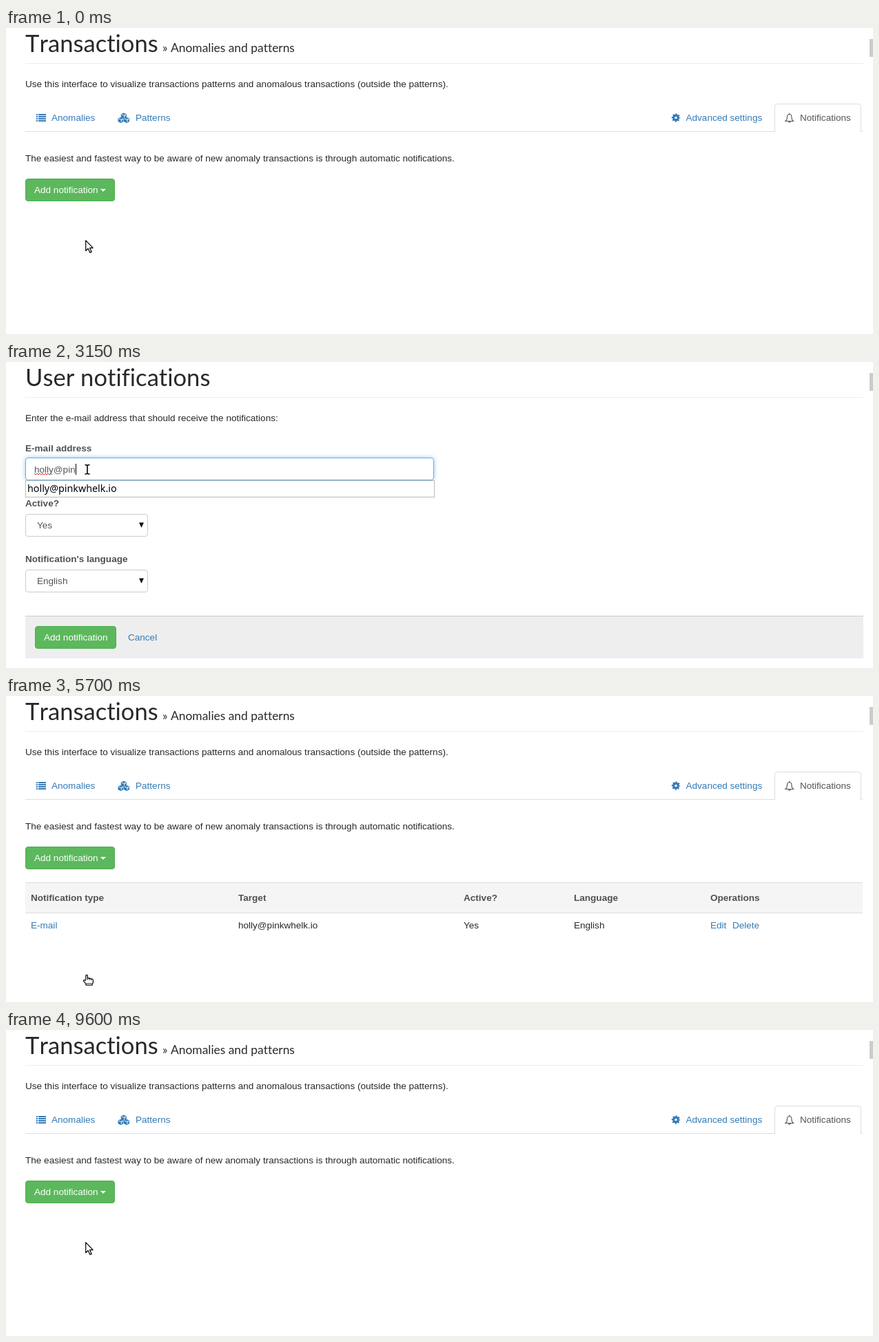
An HTML page for the animation above (9.75 s loop, 1258 by 445 pixels).

```html
<!DOCTYPE html>
<html lang="en">
<head>
<meta charset="utf-8">
<title>Transaction notifications</title>
<style>
  html, body { margin: 0; width: 100%; height: 100%; overflow: hidden; background: #fff; }
  svg { display: block; font: 13.55px "Liberation Sans", Arial, sans-serif; fill: #292929; }
  .title, .sub { font: 34.6px Lato, sans-serif; font-variant-ligatures: none; font-kerning: none; }
  .sub { font-size: 17.4px; }
  .link { fill: #337ab7; }
  .grey { fill: #555; }
  .bold { fill: #505050; font-weight: bold; }
  .white { fill: #fff; }
  .native { font: 500 14.3px "Noto Sans", sans-serif; fill: #000; }
  .button { fill: #5cb85c; stroke: #4cae4c; }
  .button.hover { fill: #449d44; stroke: #398439; }
  .button.active { fill: #398439; stroke: #255625; }
  .box { fill: #fff; stroke: #ccc; }
  .focus { stroke: #66afe9; filter: drop-shadow(0 0 3px rgba(102, 175, 233, .7)); }
  .shadow { filter: drop-shadow(0 2px 3px rgba(0, 0, 0, .3)); }
  .hovered { fill: #23527c; text-decoration: underline; }
  .cursor { fill: #fff; stroke: #000; stroke-linejoin: round; }
</style>
</head>
<body>
<svg id="stage" width="1258" height="445" viewBox="0 0 1258 445"></svg>
<script>
const STEP = 150, STEPS = 65, EMAIL = 'holly@pinkwhelk.io';

const text = (x, y, s, cls = '', id = '') => `<text x="${x}" y="${y}" class="${cls}" id="${id}">${s}</text>`;
const rect = (x, y, w, h, cls, id = '', r = 3.5) =>
  `<rect x="${x}" y="${y}" width="${w}" height="${h}" rx="${r}" class="${cls}" id="${id}"/>`;
const fill = (x, y, w, h, color, id = '') =>
  `<rect x="${x}" y="${y}" width="${w}" height="${h}" fill="${color}" id="${id}"/>`;
const path = (d, attrs) => `<path d="${d}" ${attrs}/>`;
const group = (id, ...parts) => `<g id="${id}">${parts.join('')}</g>`;

const select = (y, label, value) =>
  text(28, y - 11, label, 'bold') + rect(28.5, y + .5, 177, 32, 'box') + text(45, y + 21, value, 'grey') +
  path(`M193 ${y + 12.5}h7l-3.5 7.5z`, 'fill="#111"');

const cube = (x, y) =>
  path(`M${x} ${y - 4.3}l4 1.7v4.6l-4 2.2l-4-2.2v-4.6z`, 'fill="#337ab7"') +
  path(`M${x - 3.3} ${y - 2.1}l3.3 1.4l3.3-1.4M${x + .8} ${y + 2.9}v-2.8l2.2-1`, 'fill="none" stroke="#fff" stroke-width=".9"');

const listIcon = [0, 3, 6, 9].map(dy =>
  fill(44, 125 + dy, 2, 2, '#337ab7') + fill(47, 125 + dy, 11, 2, '#337ab7')).join('');
const cubesIcon = cube(170.8, 127.8) + cube(166.5, 134) + cube(175, 134);
const cogIcon = `<g fill="none" stroke="#337ab7"><circle cx="972" cy="130.5" r="3.3" stroke-width="3"/>
  <circle cx="972" cy="130.5" r="5" stroke-width="2.4" stroke-dasharray="2.2 1.727" stroke-dashoffset="1.1"/></g>`;
const bellIcon = path('M1131 135.5q2.5-2 2.5-6q0-3.8 3.2-4.2q3.2 .4 3.2 4.2q0 4 2.5 6zM1136.8 125v-1.3M1135.2 136.2q1.6 2 3.2 0',
  'fill="none" stroke="#555" stroke-width="1.1"');

const columns = [36, 337, 664, 824, 1022];
const cells = (labels, y, classes) => labels.map((s, i) => text(columns[i], y, s, classes[i])).join('');

const table = group('table',
  fill(28, 271, 1215, 44, '#f5f5f5'), fill(28, 271, 1215, 1, '#ddd'), fill(28, 315, 1215, 1, '#ddd'),
  cells(['Notification type', 'Target', 'Active?', 'Language', 'Operations'], 298, Array(5).fill('bold')),
  fill(28, 316, 1215, 34, '#f2f9fe', 'rowHover'),
  cells(['E-mail', EMAIL, 'Yes', 'English', 'Edit'], 338, ['link', '', '', '', 'link']),
  text(1054, 338, 'Delete', 'link', 'remove'));

const menu = group('menu', rect(27.5, 252.5, 156, 38, 'box shadow'),
  fill(28, 258, 155, 26, '#f5f5f5', 'menuHover'), text(48, 276, 'E-mail'));

const listPage = group('listPage',
  text(28, 35, 'Transactions', 'title'), text(227, 34.5, '»', 'sub'), text(239, 34.5, 'Anomalies and patterns', 'sub'),
  text(28, 86, 'Use this interface to visualize transactions patterns and anomalous transactions (outside the patterns).'),
  fill(28, 150, 1215, 1, '#ddd'),
  path('M1115.5 151v-36.5q0-4 4-4h117q4 0 4 4V151', 'fill="#fff" stroke="#ddd"'),
  listIcon, text(66, 135, 'Anomalies', 'link'), cubesIcon, text(188, 135, 'Patterns', 'link'),
  cogIcon, text(986.5, 135, 'Advanced settings', 'link'), bellIcon, text(1152, 135, 'Notifications', 'grey'),
  text(28, 194, 'The easiest and fastest way to be aware of new anomaly transactions is through automatic notifications.'),
  rect(28.5, 219.5, 129, 32, 'button', 'openMenu'), text(41, 240, 'Add notification', 'white'),
  path('M137 234h8l-4 4z', 'fill="#fff"'), table, menu);

const formPage = group('formPage',
  text(28, 35, 'User notifications', 'title'),
  text(28, 86, 'Enter the e-mail address that should receive the notifications:'),
  text(28, 130, 'E-mail address', 'bold'), rect(28.5, 139.5, 592, 32, 'box', 'field'),
  path('', 'id="squiggles" fill="none" stroke="#e22" stroke-width="1"'),
  text(41, 161, '', 'grey', 'typed'), fill(41, 148, 1, 16, '#000', 'caret'),
  select(221, 'Active?', 'Yes'), select(302, "Notification's language", 'English'),
  fill(28, 369, 1216, 62, '#eee'), fill(28, 369, 1216, 1, '#ccc'),
  rect(42.5, 384.5, 117, 32, 'button', 'submit'), text(55, 405, 'Add notification', 'white'), text(177, 405, 'Cancel', 'link'),
  group('popup', rect(28.5, 172.5, 593, 24, '', 'option', 0), text(31, 189, EMAIL, 'native')));

const dialog = group('dialog',
  `<linearGradient id="shine" x2="0" y2="1"><stop stop-color="#fff"/><stop offset="1" stop-color="#ececeb"/></linearGradient>`,
  `<rect x="308.5" y="-20" width="409" height="107.5" rx="2" fill="#f2f2f2" stroke="#a5a5a5" class="shadow"/>`,
  `<g fill="url(#shine)"><rect x="548" y="37.5" width="70" height="29" rx="4" stroke="#b5b1ac"/>
   <rect x="626.5" y="37.5" width="70" height="29" rx="4" stroke="#df7f4f" stroke-width="1.3"/></g>`,
  `<g style="font:14px 'Noto Sans',sans-serif">${text(561, 57, 'Cancel')}
   <text x="651.5" y="57" font-weight="bold">OK</text></g>`);

const cursors = group('cursor',
  group('arrow', path('M.7 .9V16l3.4-3.3l2.7 5.9l2.3-1l-2.6-5.8h4.7z', 'class="cursor" stroke-width="1.2"')),
  group('hand', path('M.8 8V2q0-1.4 1.3-1.4T3.4 2V5.4q2-.7 2.7 .5q1.8-.6 2.5 .6q2.8-.5 2.8 2V11.5q-.4 1.4-1.3 2.3V15.5H1V13.6L-2.2 9.8q-.7-1.3 .5-1.6Q-.8 8 .8 9.3', 'class="cursor" stroke-width="1.2"'),
    path('M3.4 5.4V8M6.1 6V8.3M8.6 6.6V8.6M1.5 13.2H9.6', 'stroke="#000" stroke-width=".9"')),
  group('beam', ...['stroke="#fff" stroke-width="3.4"', 'stroke="#000" stroke-width="1.6"'].map(s =>
    path('M-.5-6.5q2.5 0 3.5 1q1-1 3.5-1M-.5 7q2.5 0 3.5-1q1 1 3.5 1M3-5.5V6', 'fill="none" ' + s))));

document.getElementById('stage').innerHTML = listPage + formPage +
  fill(28, 51, 1216, 1, '#eee') + fill(1253, 16, 5, 26, '#ccc') + dialog + cursors;

const el = {};
document.querySelectorAll('[id]').forEach(node => { if (node.id) el[node.id] = node; });
const show = (id, on) => { el[id].style.display = on ? '' : 'none'; };

// Pointer path: step, x, y and the shape used from that step on
const pointer = [
  [0, 115, 308, 'arrow'], [3, 115, 236, 'hand'], [4, 115, 236, 'hand'], [5, 115, 269, 'hand'],
  [8, 115, 269, 'arrow'], [11, 115, 156, 'beam'], [30, 115, 156, 'beam'], [31, 115, 193, 'arrow'],
  [32, 115, 193, 'arrow'], [36, 115, 405, 'hand'], [38, 115, 405, 'hand'], [39, 115, 405, 'arrow'],
  [43, 930, 355, 'arrow'], [44, 1040, 338, 'arrow'], [45, 1073, 327, 'hand'], [52, 1073, 327, 'arrow'],
  [57, 1073, 327, 'arrow'], [64, 115, 308, 'arrow']
];

function movePointer(n) {
  const i = pointer.findLastIndex(k => k[0] <= n);
  const [n0, x0, y0, shape] = pointer[i];
  const [n1, x1, y1] = pointer[i + 1] || [n0 + 1, x0, y0];
  let p = (n - n0) / (n1 - n0);
  if (n1 - n0 > 3) p = p * p * (3 - 2 * p);
  el.cursor.setAttribute('transform', `translate(${Math.round(x0 + (x1 - x0) * p)} ${Math.round(y0 + (y1 - y0) * p)})`);
  for (const id of ['arrow', 'hand', 'beam']) show(id, id === shape);
}

const widthOf = s => {
  el.typed.textContent = s;
  return s ? el.typed.getComputedTextLength() : 0;
};

function squiggle(from, to) {
  let d = `M${from} 162`;
  for (let x = from + 2, up = 0; x <= to; x += 2, up = !up) d += `L${x} ${up ? 162 : 164}`;
  return d;
}

function drawField(n) {
  const count = Math.max(0, Math.min(EMAIL.length, n - 12));
  const at = EMAIL.indexOf('@'), dot = EMAIL.indexOf('.');
  let marks = '';
  if (count > at) marks += squiggle(41, 41 + widthOf(EMAIL.slice(0, at)));
  if (count > dot) marks += squiggle(41 + widthOf(EMAIL.slice(0, at + 1)), 41 + widthOf(EMAIL.slice(0, dot)));
  el.squiggles.setAttribute('d', marks);
  el.caret.setAttribute('x', Math.round(41 + widthOf(EMAIL.slice(0, count))));
  show('caret', n >= 12);
  el.field.classList.toggle('focus', n >= 12);
  el.field.style.fill = n >= 31 ? '#faffbd' : '';
  el.typed.style.fill = n >= 31 ? '#000' : '';
  show('popup', n >= 13 && n < 32);
  el.option.style.fill = n === 31 ? '#ccc' : '#fff';
  el.option.style.stroke = n === 31 ? '#ccc' : '#bbb';
  el.submit.classList.toggle('hover', n === 36);
  el.submit.classList.toggle('active', n === 37);
}

function render(n) {
  const form = n >= 7 && n < 38;
  show('formPage', form);
  show('listPage', !form);
  if (form) drawField(n);
  el.openMenu.classList.toggle('hover', n >= 3 && n < 7);
  show('menu', n >= 4 && n < 7);
  show('menuHover', n >= 5);
  show('table', n >= 38 && n < 52);
  show('rowHover', n >= 44);
  el.remove.classList.toggle('hovered', n >= 45);
  show('dialog', n === 50);
  movePointer(n);
}

const start = performance.now();
function tick() {
  render(Math.floor((performance.now() - start) / STEP) % STEPS);
  requestAnimationFrame(tick);
}
tick();
</script>
</body>
</html>
```
